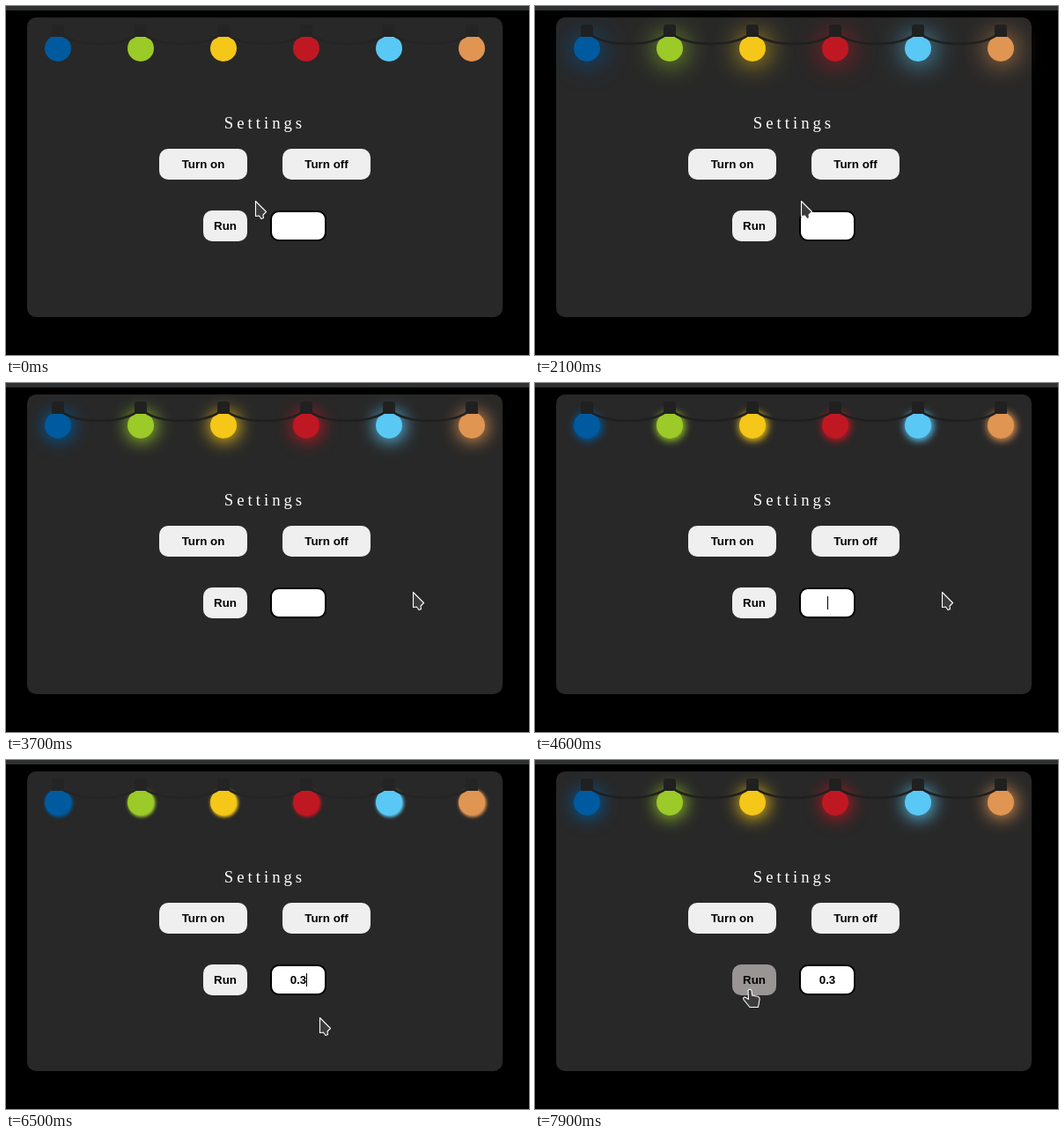
An HTML page for the animation above (8 s loop, 594 by 396 pixels).

```html
<!DOCTYPE html>
<html lang="en">
<head>
<meta charset="utf-8">
<title>Light garland settings</title>
<style>
  html, body { margin: 0; width: 100%; height: 100%; overflow: hidden; background: #000; }
  #stage { position: relative; width: 594px; height: 396px; overflow: hidden; }
  #stage > * { position: absolute; box-sizing: border-box; }
  .bar { left: 0; top: 0; width: 594px; height: 5px; background: #2e3031; }
  .card { left: 24px; top: 13px; width: 540px; height: 340px; border-radius: 10px; background: #282828; }
  .bulb { top: 33px; width: 30px; height: 30px; border-radius: 50%; }
  h3 { left: 24px; top: 122px; width: 540px; margin: 0; text-align: center; color: #fff;
       font: 400 18.72px/22px "Liberation Serif", serif; letter-spacing: 4px; }
  .box { height: 35px; border-radius: 10px; background: #efefef; color: #000; text-align: center;
         font: 700 13.333px/35px "Liberation Sans", sans-serif; }
  .hover { background: #999595; }
  #field { left: 300px; top: 232px; width: 64px; border: 2px solid #000; background: #fff; line-height: 31px; }
  #caret { display: inline-block; width: 1px; height: 15px; margin-right: -1px; background: #000; vertical-align: -3px; }
  svg { left: 0; top: 0; }
</style>
</head>
<body>
<div id="stage">
  <div class="bar"></div>
  <div class="card"></div>
  <h3>Settings</h3>
  <div class="box" id="on" style="left:174px;top:162px;width:100px">Turn on</div>
  <div class="box" style="left:314px;top:162px;width:100px">Turn off</div>
  <div class="box" id="run" style="left:224px;top:232px;width:50px">Run</div>
  <div class="box" id="field"><span id="text"></span><span id="caret"></span></div>
  <svg id="garland" width="594" height="396"></svg>
  <svg width="594" height="396">
    <g id="pointer" fill="#3c3c3c" stroke="#fff" stroke-width="1.1" stroke-linejoin="round">
      <path id="arrow" d="M.5.5V17.5L4.5 17L7 20.5L9.5 19.5L9 16L12.5 12.5Z"/>
      <path id="hand" d="M-2 1.5Q0-1 2 1.5L2.5 7L9.5 8.5Q11.5 9.5 11 12L9.5 20.5H0L-7 12Q-8 9-5.5 9L-1.5 11.5Z"/>
      <path id="beam" fill="none" stroke="#333" d="M-3-8H3M0-8V8M-3 8H3"/>
    </g>
  </svg>
</div>
<script>
const LOOP = 8000;
const $ = id => document.getElementById(id);
const colors = ['#005a9f', '#9bca29', '#f4c718', '#c01823', '#5ac8f5', '#e09552'];
const bulbX = i => 59 + 94 * i;

const bulbs = colors.map((color, i) => {
  const bulb = document.createElement('div');
  bulb.className = 'bulb';
  bulb.style.left = bulbX(i) - 15 + 'px';
  bulb.style.background = color;
  $('stage').insertBefore(bulb, $('garland'));
  return bulb;
});

$('garland').innerHTML = colors.map((_, i) => {
  const x = bulbX(i);
  const wire = i < 5 ? `<path d="M${x} 25A47 18 0 0 0 ${x + 94} 25" fill="none" stroke="currentColor" stroke-width="2.6"/>` : '';
  return wire + `<path d="M${x - 7} 35V24q0-3 3-3h8q3 0 3 3v11z" fill="currentColor"/>`;
}).join('');

const ease = p => (1 - Math.cos(Math.PI * p)) / 2;

// Eased interpolation through [time, ...values] keys.
function track(keys, t) {
  const next = keys.findIndex(k => k[0] > t);
  if (next === 0) return keys[0].slice(1);
  if (next < 0) return keys[keys.length - 1].slice(1);
  const a = keys[next - 1], b = keys[next];
  const p = ease((t - a[0]) / (b[0] - a[0]));
  return a.slice(1).map((v, i) => v + (b[i + 1] - v) * p);
}

const glowKeys = [[500, 0], [1100, 1], [2150, 1], [2450, .1], [2550, .1], [3250, 1],
  [4300, .1], [5350, 1], [6400, .1], [7450, 1], [8500, .1]];
const pointerKeys = [[50, 283, 221], [400, 248, 184], [1350, 248, 184], [2100, 302, 221],
  [2300, 330, 240], [2520, 330, 240], [3200, 462, 237], [6250, 462, 237],
  [6500, 356, 292], [6700, 312, 303], [7100, 246, 262], [7200, 245, 261], [7300, 244, 260]];
const typing = [[2200, ''], [5200, '0'], [5500, '0.'], [6100, '0.3']];
const BLUR_TIME = 7100;

function drawLights(t) {
  const [glow] = track(glowKeys, t);
  const spread = 2 * Math.sin(Math.PI * glow);
  bulbs.forEach((bulb, i) => {
    bulb.style.boxShadow = glow > 0 ? `1px 1px ${30 * glow}px ${spread}px ${colors[i]}` : 'none';
  });
  $('garland').style.color = glow < .2 ? '#242424' : '#202020';
}

function drawField(t) {
  const entry = typing.filter(k => k[0] <= t).pop();
  $('text').textContent = entry ? entry[1] : '';
  const lit = entry && t < BLUR_TIME && (t - entry[0]) % 1000 < 500;
  $('caret').style.visibility = lit ? 'visible' : 'hidden';
}

function drawPointer(t) {
  const [x, y] = track(pointerKeys, t).map(Math.round);
  const inside = (l, top, w) => x >= l && x < l + w && y >= top && y < top + 35;
  const overOn = inside(174, 162, 100), overRun = inside(224, 232, 50);
  const shape = overOn || overRun ? 'hand' : inside(300, 232, 64) ? 'beam' : 'arrow';
  $('on').classList.toggle('hover', overOn);
  $('run').classList.toggle('hover', overRun);
  for (const id of ['arrow', 'hand', 'beam']) $(id).style.display = id === shape ? '' : 'none';
  $('pointer').setAttribute('transform', `translate(${x} ${y})`);
}

const start = performance.now();
function frame() {
  const t = (performance.now() - start) % LOOP;
  drawLights(t);
  drawField(t);
  drawPointer(t);
  requestAnimationFrame(frame);
}
frame();
</script>
</body>
</html>
```
